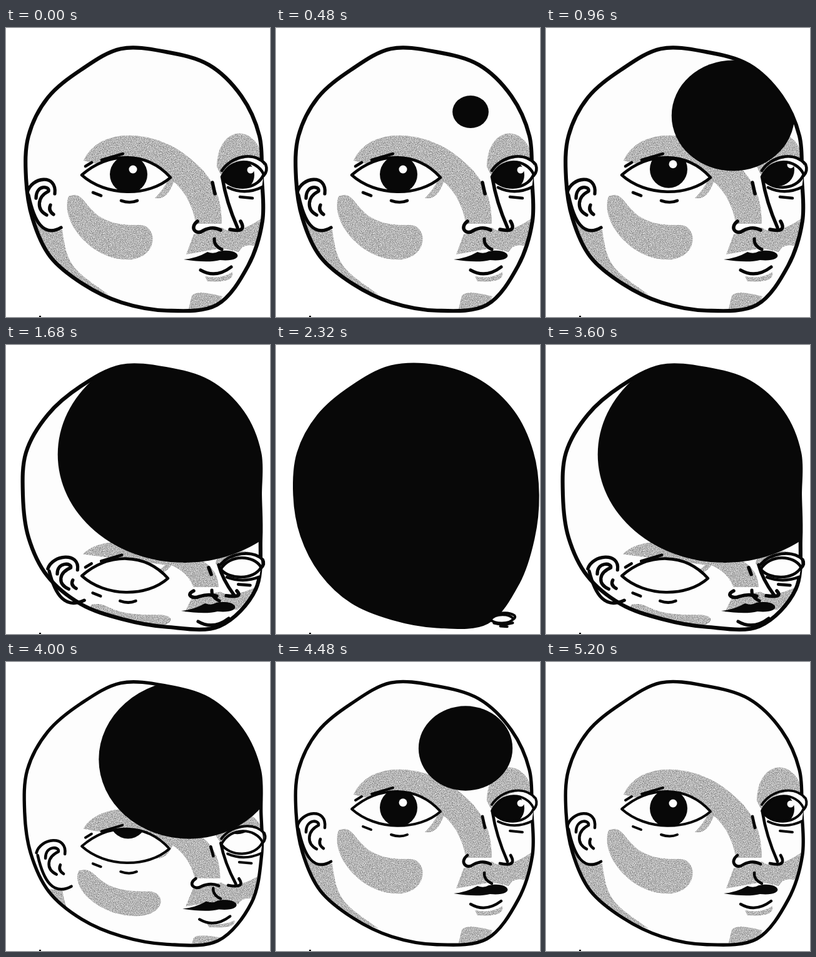
Write an HTML page that moves like this. It is 422x462 px and loops after 5.28 s.

```html
<!DOCTYPE html>
<html lang="en">
<head>
<meta charset="utf-8">
<title>Turning head</title>
<style>
  html, body { margin: 0; width: 100%; height: 100%; overflow: hidden; background: #fff; }
  svg { display: block; width: 100vw; height: 100vh; }
  path { vector-effect: non-scaling-stroke; }
  .ink { fill: none; stroke: #060606; stroke-linecap: round; stroke-linejoin: round; }
  .white { fill: #fdfdfd; }
  .black { fill: #080808; }
</style>
</head>
<body>
<svg viewBox="0 0 422 462">
  <defs>
    <path id="leftAlmond" d="M121 235C165 197 225 197 263 239C228 270 160 270 121 235Z"/>
    <path id="rightAlmond" d="M345 238C360 206 400 208 412 234C400 262 358 260 345 238Z"/>
    <clipPath id="leftClip"><use href="#leftAlmond"/></clipPath>
    <clipPath id="rightClip"><use href="#rightAlmond"/></clipPath>
    <clipPath id="headClip"><path class="head"/></clipPath>
    <filter id="grain" filterUnits="userSpaceOnUse" x="0" y="0" width="422" height="462" color-interpolation-filters="sRGB">
      <feTurbulence type="fractalNoise" baseFrequency=".85" numOctaves="2" seed="4"/>
      <feColorMatrix values=".9 0 0 0 .26  .9 0 0 0 .26  .9 0 0 0 .26  0 0 0 0 1"/>
      <feComposite in2="SourceGraphic" operator="in"/>
    </filter>
  </defs>

  <rect x="53" y="460" width="3" height="2"/>
  <path class="head white"/>

  <g clip-path="url(#headClip)"><g filter="url(#grain)" fill="#b4b4b4">
    <path id="brow" d="M124 212C150 155 240 164 290 205C335 240 344 270 345 313H304C299 290 290 264 268 246Q258 276 238 272Q250 260 258 245Z"/>
    <path id="rightBrow" d="M337 222C338 155 400 150 412 213Q360 200 345 238Z"/>
    <path id="lipShade" d="M300 330L345 319Q365 335 412 302L404 350Q380 342 372 358L345 352L288 362Z"/>
    <path id="chin" d="M291 452L297 428Q304 418 346 429L336 452ZM318 397Q345 402 362 390Q366 408 322 405Z"/>
    <path id="jaw" d="M40 295L58 320L90 323C98 380 105 385 164 426L60 400Z"/>
    <path id="cheek" d="M100 269C85 310 140 375 200 370C245 365 243 313 212 315C120 318 135 255 100 269Z"/>
  </g></g>

  <path class="head ink" data-weight="5.6"/>

  <path id="ear" class="ink" data-weight="4.8" d="M34 263C40 238 82 232 78 265M36 267C45 310 60 335 88 319M48 272C48 250 70 252 68 261C50 270 48 290 65 299M71 283Q67 292 76 298"/>
  <path id="nose" class="ink" data-weight="5" d="M346 240Q352 278 370 319M306 309C292 320 305 332 315 324Q330 316 343 323M375 309Q386 328 358 322M330 247L334 265"/>

  <g id="mouth">
    <path class="black" d="M284 370Q305 368 322 358Q332 362 340 357C375 350 385 375 342 371Q322 376 284 370Z"/>
    <path class="ink" data-weight="4.6" d="M333 337Q332 348 345 354M311 387Q335 401 360 382"/>
  </g>

  <g id="leftEye">
    <use href="#leftAlmond" class="white"/>
    <g clip-path="url(#leftClip)"><g class="iris">
      <circle class="black" cx="196" cy="234" r="30"/><circle class="white" cx="203" cy="226" r="6.5"/>
    </g></g>
    <use href="#leftAlmond" class="ink" data-weight="4.2"/>
    <path class="ink" data-weight="4.2" d="M127 221L137 215M153 211L187 201M139 263L152 268M184 276Q198 281 210 276"/>
  </g>

  <g id="rightEye">
    <path class="white" d="M345 236C352 212 425 182 411 240L409 256Q380 268 354 253Z"/>
    <g clip-path="url(#rightClip)"><g class="iris">
      <circle class="black" cx="371" cy="235" r="26"/><circle class="white" cx="391" cy="227" r="5.5"/>
    </g></g>
    <use href="#rightAlmond" class="ink" data-weight="4.2"/>
    <path class="ink" data-weight="4.2" d="M345 228C360 205 396 196 415 218Q419 228 412 236M355 255Q382 268 410 254M374 270L394 272"/>
  </g>

  <g clip-path="url(#headClip)"><ellipse id="ball" class="black"/></g>
</svg>

<script>
const STEP = 80, STEPS = 66;

// Head contour: radii around (220, 240), one every 20 degrees clockwise from the right.
const resting = [189, 202, 218, 234, 215, 202, 195, 195, 189, 188, 196, 200, 200, 210, 205, 209, 204, 197];
const halfTurned = [186, 199, 234, 242, 214, 201, 201, 201, 196, 193, 200, 200, 201, 209, 205, 209, 206, 197];
const fullyTurned = [198, 203, 218, 235, 213, 200, 197, 193, 190, 190, 196, 198, 199, 208, 209, 210, 207, 201];
const contours = [resting, halfTurned, fullyTurned];

const $ = id => document.getElementById(id);
const all = selector => [...document.querySelectorAll(selector)];
const heads = all('.head'), irises = all('.iris'), inked = all('[data-weight]');

// A part rests at (cx, cy), is moved and scaled by the half turn, then tucks under the ball.
function part(id, cx, cy, x, y, sx, sy, ...later) {
  const tucked = [(x + 240) / 2, 415, sx * .6, .1];
  return { el: $(id), cx, cy, poses: [[cx, cy, 1, 1], [x, y, sx, sy], ...(later.length ? later : [tucked])] };
}

const parts = [
  part('ear', 61, 281, 96, 374, 1.08, .9),
  part('jaw', 100, 370, 100, 440, 1, .5),
  part('cheek', 166, 320, 199, 433, .94, .36),
  part('brow', 235, 242, 232, 350, .98, .52),
  part('rightBrow', 374, 202, 372, 342, 1, .4),
  part('lipShade', 350, 333, 348, 405, 1, .75),
  part('chin', 328, 425, 335, 456, 1, .4),
  part('nose', 340, 284, 334, 378, 1, .6),
  part('mouth', 328, 364, 324, 419, 1, 1),
  part('leftEye', 192, 236, 190, 370, .97, .98),
  part('rightEye', 380, 235, 377, 356, .96, .76, [362, 438, .55, .33], [355, 476, .5, .25])
];

// Centre x, centre y, height to width ratio.
const ballPoses = [[299, 140, .9], [285, 175, .855], [262, 215, .9]];

function mix(list, k) {
  const i = Math.min(Math.floor(k), list.length - 2);
  const f = Math.min(k - i, 1);
  return list[i].map((v, j) => v + (list[i + 1][j] - v) * f);
}

function contourPath(radii) {
  const count = radii.length;
  const points = radii.map((r, i) => {
    const a = i * 2 * Math.PI / count;
    return [220 + r * Math.cos(a), 240 + r * Math.sin(a)];
  });
  const at = i => points[(i + count) % count];
  const handle = (p, from, to) => p.map((v, a) => v + (to[a] - from[a]) / 6);
  const curves = points.map((p, i) => 'C' + [
    handle(p, at(i - 1), at(i + 1)),
    handle(at(i + 1), at(i + 2), p),
    at(i + 1)
  ].join(' '));
  return 'M' + points[0] + curves.join('') + 'Z';
}

function turnAt(t) {
  if (t <= 960) return 0;
  return t <= 1680 ? (t - 960) / 720 : 1 + (t - 1680) / 640;
}

function set(el, attributes) {
  for (const name in attributes) el.setAttribute(name, attributes[name]);
}

function draw(ms) {
  const n = Math.floor(ms / STEP) % STEPS;
  const t = Math.min(n, STEPS - n) * STEP;
  const turn = turnAt(t);

  const d = contourPath(mix(contours, turn));
  heads.forEach(el => set(el, { d }));

  for (const { el, cx, cy, poses } of parts) {
    const [x, y, sx, sy] = mix(poses, turn);
    set(el, { transform: `translate(${x} ${y}) scale(${sx} ${sy}) translate(${-cx} ${-cy})` });
  }

  const roll = 60 * Math.min(1, Math.max(0, (t - 700) / 700)) ** 2;
  irises.forEach(el => set(el, { transform: `translate(0 ${-roll})` }));

  // The pen weight pulses through three redrawn lines.
  const weight = [1.1, 1.03, .95][n % 3];
  inked.forEach(el => set(el, { 'stroke-width': el.dataset.weight * weight }));

  const [x, y, ratio] = mix(ballPoses, turn);
  const drift = Math.max(0, 960 - t) / 160;
  const rx = Math.max(0, t - 280) * .1445;
  set($('ball'), { cx: x + 4 * drift, cy: y - 2 * drift, rx, ry: rx * ratio });
}

const start = performance.now();
function tick() {
  draw(performance.now() - start);
  requestAnimationFrame(tick);
}
tick();
</script>
</body>
</html>
```
